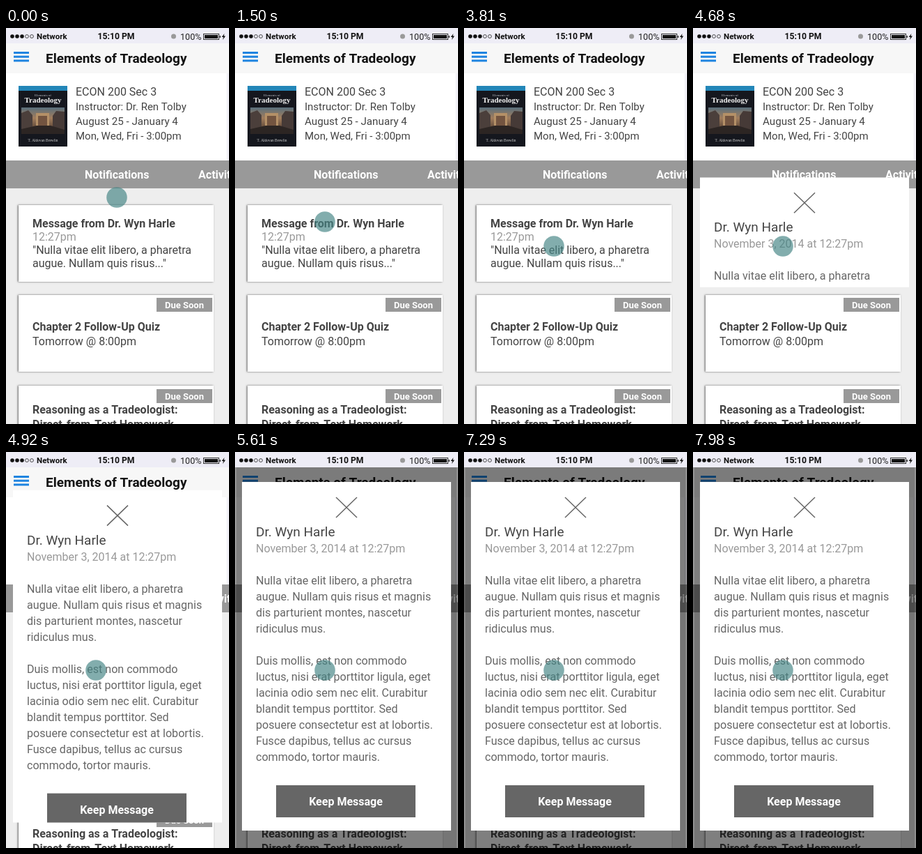
An HTML page with a canvas for the animation above (8000 ms loop, 320 by 568 pixels).

```html
<!DOCTYPE html>
<html lang="en">
<head>
<meta charset="utf-8">
<title>Course notifications</title>
<style>
html, body { margin: 0; width: 100%; height: 100%; overflow: hidden; background: #eee; }
canvas { display: block; width: 320px; height: 568px; }
</style>
</head>
<body>
<canvas id="stage"></canvas>
<script>
const W = 320, H = 568, LOOP = 8000;
const canvas = document.getElementById('stage');
const ctx = canvas.getContext('2d');
const dpr = window.devicePixelRatio || 1;
canvas.width = W * dpr;
canvas.height = H * dpr;

const SANS = 'Roboto, sans-serif';
const SERIF = '"Liberation Serif", serif';

const ramp = (t, start, length) => Math.min(1, Math.max(0, (t - start) / length));
const ease = p => p * p * (3 - 2 * p);

function box(x, y, w, h, color) {
  ctx.fillStyle = color;
  ctx.fillRect(x, y, w, h);
}

function text(str, x, y, size, color, weight = 400, align = 'left', family = SANS) {
  ctx.font = `${weight} ${size}px ${family}`;
  ctx.textAlign = align;
  ctx.fillStyle = color;
  ctx.fillText(str, x, y);
}

function disc(x, y, r, color) {
  ctx.fillStyle = color;
  ctx.beginPath();
  ctx.arc(x, y, r, 0, Math.PI * 2);
  ctx.fill();
}

function shape(points, color) {
  ctx.fillStyle = color;
  ctx.beginPath();
  points.forEach(([x, y]) => ctx.lineTo(x, y));
  ctx.fill();
}

function statusBar() {
  box(0, 0, W, 22, '#eeedf6');
  for (let i = 0; i < 5; i++) {
    const x = 9 + i * 7;
    if (i < 3) {
      disc(x, 12, 2.8, '#111');
    } else {
      ctx.strokeStyle = '#222';
      ctx.lineWidth = 0.8;
      ctx.beginPath();
      ctx.arc(x, 12, 2.4, 0, Math.PI * 2);
      ctx.stroke();
    }
  }
  text('Network', 44, 16, 11.5, '#111', 700);
  text('15:10 PM', 158, 16, 12.2, '#111', 700, 'center');
  disc(240.5, 12, 3.5, '#999');
  text('100%', 250, 17, 12.6, '#222');
  ctx.strokeStyle = '#333';
  ctx.lineWidth = 1;
  ctx.strokeRect(283.5, 8.5, 22, 8);
  box(285, 10, 19, 5, '#111');
  box(306.5, 11, 1.5, 3, '#333');
  shape([[313.5, 8], [309.5, 13], [312, 13], [311, 17], [315, 11.5], [312.5, 11.5]], '#111');
}

function bookCover() {
  box(18, 83, 70, 87, '#15171e');
  box(18, 83, 70, 7, '#2386b8');
  text('Elements of', 53, 98, 5, '#b9bcc4', 400, 'center', SERIF);
  text('Tradeology', 53, 107, 11, '#f2f2f2', 700, 'center', SERIF);

  const sky = ctx.createLinearGradient(0, 114, 0, 152);
  sky.addColorStop(0, '#596f7c');
  sky.addColorStop(0.4, '#a07c5c');
  sky.addColorStop(1, '#3a2b25');
  ctx.fillStyle = sky;
  ctx.fillRect(22, 114, 62, 38);
  shape([[22, 122], [32, 118], [38, 125], [38, 144], [22, 147]], '#4b3f3b');
  shape([[84, 120], [72, 119], [67, 126], [67, 144], [84, 147]], '#463a37');
  box(43, 122, 19, 20, '#b49067');
  box(46, 126, 13, 16, '#735440');
  shape([[22, 152], [22, 145], [44, 140], [64, 140], [84, 146], [84, 152]], '#2c2523');
  text('T. Aldovan Brewlin', 53, 163, 5.4, '#d0d0d0', 400, 'center', SERIF);
}

function card(y) {
  ctx.save();
  ctx.shadowColor = 'rgba(0,0,0,.6)';
  ctx.shadowBlur = 2.5 * dpr;
  ctx.shadowOffsetX = -0.6 * dpr;
  box(18, y, 280, 110, '#fff');
  ctx.restore();
}

function badge(y) {
  box(216, y, 80, 20, '#999');
  text('Due Soon', 256, y + 15, 13, '#fff', 700, 'center');
}

function page() {
  box(0, 0, W, H, '#eee');
  box(0, 22, W, 43, '#f7f7f7');
  for (let i = 0; i < 3; i++) box(11, 34 + i * 5.7, 22, 3, '#1e84e0');
  text('Elements of Tradeology', 57, 50, 19, '#111', 700);

  box(0, 65, W, 125, '#fff');
  box(316.5, 65, 3.5, 125, '#f2f1f7');
  bookCover();
  text('ECON 200 Sec 3', 100, 97, 16, '#444');
  text('Instructor: Dr. Ren Tolby', 100, 118, 15, '#444');
  text('August 25 - January 4', 100, 139, 15.2, '#444');
  text('Mon, Wed, Fri - 3:00pm', 100, 160, 15, '#444');

  box(0, 190, W, 40, '#999');
  text('Notifications', 113, 216, 16, '#fff', 700);
  text('Activity', 276, 216, 16, '#fff', 700);

  card(254);
  text('Message from Dr. Wyn Harle', 38, 286, 16, '#444', 700);
  text('12:27pm', 38, 305, 16, '#999');
  text('"Nulla vitae elit libero, a pharetra', 38, 324, 16, '#444');
  text('augue. Nullam quis risus..."', 38, 343, 16, '#444');

  card(383);
  badge(387);
  text('Chapter 2 Follow-Up Quiz', 38, 434, 16, '#444', 700);
  text('Tomorrow @ 8:00pm', 38, 455, 16, '#444');

  card(513);
  badge(518);
  text('Reasoning as a Tradeologist:', 38, 553, 16, '#444', 700);
  text('Direct-from-Text Homework', 38, 574, 16, '#444', 700);
}

const LETTER = [
  'Nulla vitae elit libero, a pharetra',
  'augue. Nullam quis risus et magnis',
  'dis parturient montes, nascetur',
  'ridiculus mus.',
  '',
  'Duis mollis, est non commodo',
  'luctus, nisi erat porttitor ligula, eget',
  'lacinia odio sem nec elit. Curabitur',
  'blandit tempus porttitor. Sed',
  'posuere consectetur est at lobortis.',
  'Fusce dapibus, tellus ac cursus',
  'commodo, tortor mauris.'
];

// The panel opens from its middle; its contents hang from the top edge.
function modal(open) {
  if (open <= 0) return;
  const h = 500 * open, top = 293 - h / 2;
  ctx.save();
  ctx.beginPath();
  ctx.rect(10, top, 300, h);
  ctx.clip();
  ctx.translate(0, top);
  box(10, 0, 300, 500, '#fff');
  ctx.strokeStyle = '#666';
  ctx.lineWidth = 1.5;
  ctx.beginPath();
  ctx.moveTo(145, 22);
  ctx.lineTo(175, 51);
  ctx.moveTo(175, 22);
  ctx.lineTo(145, 51);
  ctx.stroke();
  text('Dr. Wyn Harle', 30, 78, 19, '#444');
  text('November 3, 2014 at 12:27pm', 30, 101, 16, '#999');
  LETTER.forEach((line, i) => text(line, 30, 147 + i * 23, 16.1, '#666'));
  box(59, 435, 200, 46, '#666');
  text('Keep Message', 159, 464, 16, '#fff', 700, 'center');
  ctx.restore();
}

function shade(amount) {
  box(2, 22, 316, H - 22, `rgba(0,0,0,${0.5 * amount})`);
  for (const x of [0, 318]) box(x, 22, 2, H - 22, `rgba(0,0,0,${0.4 * amount})`);
}

function draw(t) {
  ctx.setTransform(dpr, 0, 0, dpr, 0, 0);
  page();
  shade(ramp(t, 5000, 300));
  statusBar();
  modal(ease(ramp(t, 4500, 484)));
  const x = 159 - 30 * ease(ramp(t, 0, 1500));
  const y = 243 + 70 * ease(ramp(t, 0, 3000));
  disc(x, y, 14.8, 'rgba(65,130,130,.66)');
}

function tick() {
  draw(performance.now() % LOOP);
  requestAnimationFrame(tick);
}
tick();
</script>
</body>
</html>
```
